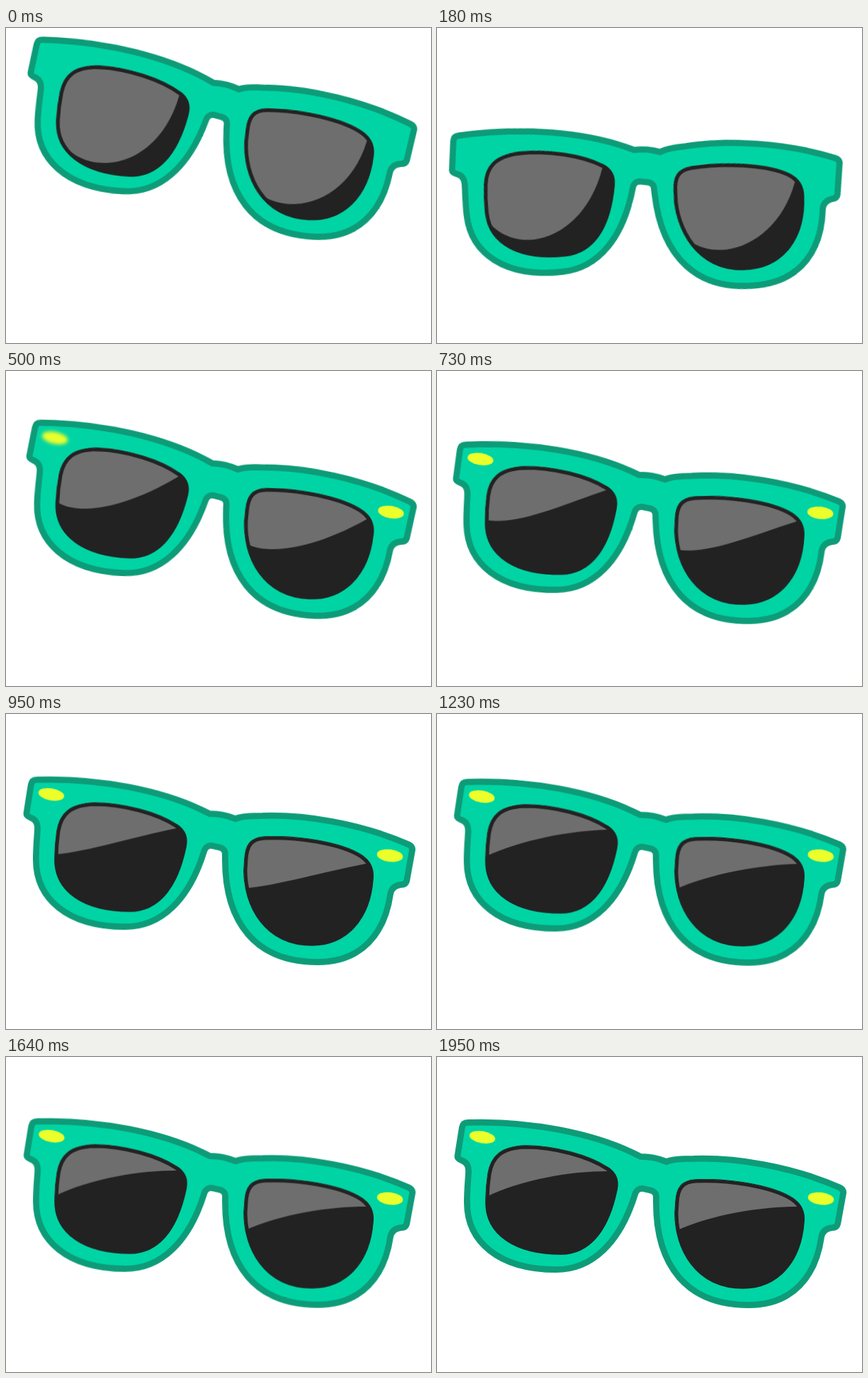
Animation, 600 px wide and 444 px high, one loop 1.99 s. Source, as an HTML page without scripts:

```html
<!DOCTYPE html>
<html lang="en">
<head>
<meta charset="utf-8">
<title>Sunglasses</title>
<style>
html, body { margin: 0; width: 100%; height: 100%; overflow: hidden; background: #fff; }
svg { display: block; width: 100vw; height: 100vh; }

.drop, .swing, .shine, .stud { animation: 1990ms infinite both; }

.drop { animation-name: drop; animation-timing-function: ease-in-out; }
@keyframes drop {
  0% { transform: translateY(-49px); }
  9% { transform: translateY(0); }
  12% { transform: translateY(2px); }
  20%, 100% { transform: translateY(0); }
}

/* damped swing, hinged at the right temple */
.swing {
  transform-origin: 560px 238px;
  animation-name: swing;
  animation-timing-function: cubic-bezier(.37, 0, .63, 1);
}
@keyframes swing {
  0% { transform: rotate(3deg); }
  10.05% { transform: rotate(-6.7deg); }
  27.1% { transform: rotate(2.45deg); }
  38.7% { transform: rotate(-1.55deg); }
  53.8% { transform: rotate(.75deg); }
  64.8% { transform: rotate(-.6deg); }
  79.9% { transform: rotate(.22deg); }
  90% { transform: rotate(-.08deg); }
  98%, 100% { transform: rotate(0); }
}

.edge, .frame { fill: #00d4a4; stroke: #0e9b78; }
.edge { stroke-width: 2; }
.frame { stroke-width: 15.5; }
.lens { fill: #222; stroke: #222; stroke-width: 1.6; }
.rim { fill: none; stroke: #222; stroke-width: 9; }

.shine { fill: #6e6e6e; animation-name: shine; animation-timing-function: linear; }
@keyframes shine {
  0% { d: path("M58 200C85 292 212 282 240 161V90H58Z"); }
  9% { d: path("M58 190C85 280 200 268 240 161V90H58Z"); }
  25.1% { d: path("M66 200C92 222 160 213 240 161V90H58Z"); }
  36.7% { d: path("M66 198C110 210 175 181 240 161V90H58Z"); }
  61.8% { d: path("M68 198C120 174 190 162 240 161V90H58Z"); }
  80%, 100% { d: path("M68 198C120 172 190 161 240 161V90H58Z"); }
}

.stud { fill: #ebff2b; animation-timing-function: linear; }
.left { animation-name: glow-left; }
.right { animation-name: glow-right; }
@keyframes glow-left {
  0%, 17% { opacity: 0; filter: blur(6px); }
  25.1% { opacity: 1; filter: blur(2.6px); }
  30%, 100% { opacity: 1; filter: blur(0); }
}
@keyframes glow-right {
  0%, 13% { opacity: 0; filter: blur(6px); }
  22% { opacity: 1; filter: blur(2px); }
  26%, 100% { opacity: 1; filter: blur(0); }
}
</style>
</head>
<body>
<svg viewBox="0 0 600 444">
  <defs>
    <path id="body" d="M43 89C130 86 225 104 288 137C300 137 314 140 324 144C334 140 350 140 362 140C420 138 500 150 570 181Q578 185 577 192L569 236Q567 244 558 244Q548 245 546 254C538 310 505 353 440 353C350 353 306 295 306 205V197Q306 192 300 191L291 189Q285 188 283 194C262 262 222 303 168 303C85 303 39 262 39 205C39 188 40 180 41 164Q42 153 36 150L32 148Q24 145 26 137L32 99Q34 89 43 89Z"/>
    <path id="lens-l" d="M72 165C76 140 90 126 125 125C165 125 215 138 243 157Q258 168 254 187C242 245 215 278 175 278C110 278 69 250 69 205C69 190 70 178 72 165Z"/>
    <path id="lens-r" d="M337 205C338 185 345 174 365 173C410 171 472 180 502 199Q520 211 518 232C514 290 480 326 432 326C365 326 336 270 336 220Z"/>
    <clipPath id="in-body"><use href="#body"/></clipPath>
    <clipPath id="in-l"><use href="#lens-l"/></clipPath>
    <clipPath id="in-r"><use href="#lens-r"/></clipPath>
  </defs>
  <g class="drop">
    <g class="swing">
      <use class="edge" href="#body"/>
      <g clip-path="url(#in-body)"><use class="frame" href="#body"/></g>
      <use class="lens" href="#lens-l"/>
      <g clip-path="url(#in-l)">
        <path class="shine" d="M68 198C120 172 190 161 240 161V90H58Z"/>
        <use class="rim" href="#lens-l"/>
      </g>
      <use class="lens" href="#lens-r"/>
      <g clip-path="url(#in-r)">
        <g transform="matrix(1 0 0 .94 268 59.7)">
          <path class="shine" d="M68 198C120 172 190 161 240 161V90H58Z"/>
        </g>
        <use class="rim" href="#lens-r"/>
      </g>
      <g transform="translate(64 113) rotate(10)"><ellipse class="stud left" rx="18.4" ry="8.6"/></g>
      <g transform="translate(542 199.5) rotate(7)"><ellipse class="stud right" rx="18.4" ry="8.8"/></g>
    </g>
  </g>
</svg>
</body>
</html>
```
